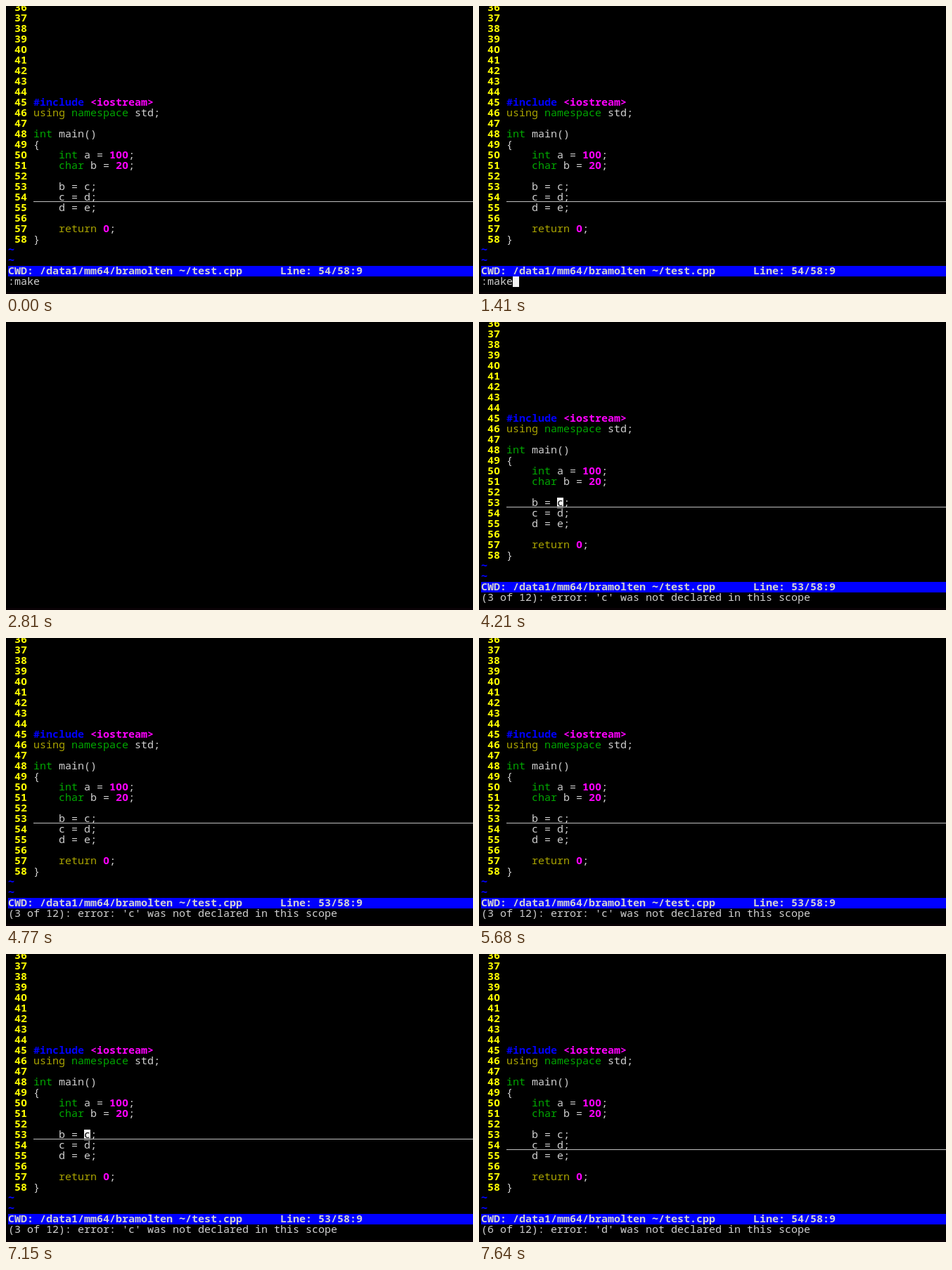
Recreate the animation shown at these times as an HTML page with a canvas. Size 664 px wide and 410 px high, loop 8000 ms.

```html
<!DOCTYPE html>
<html lang="en">
<head>
<meta charset="utf-8">
<title>Editor build session</title>
<style>
html, body { margin: 0; width: 664px; height: 410px; overflow: hidden; background: #000; }
canvas { display: block; }
</style>
</head>
<body>
<canvas id="stage" width="664" height="410"></canvas>
<script>
const ctx = document.getElementById('stage').getContext('2d');
const W = 664, H = 410, LOOP = 8000;
const CELL = 9, ROW = 15, LEFT = 3, TOP = -5, BASE = 12;
const GREY = '#c0c0c0', TEXT = '#d0d0d0', YELLOW = '#ffff00', BLUE = '#0000ff',
      PINK = '#ff00ff', GREEN = '#00a800', OLIVE = '#aaa400', LIGHT = '#f4f4f4';
const FIRST = 36, LAST = 58, STATUS = 25, COMMAND = 26, CODE_COL = 4;

const MONO = '"Noto Sans Mono", monospace';
// A plain zero and a broad tilde come from other faces
const faces = { '0': '"Noto Sans", sans-serif', '~': '"DejaVu Sans Mono", monospace' };

// Each piece: text, colour, bold
const code = {
  45: [['#include ', BLUE, true], ['<iostream>', PINK, true]],
  46: [['using ', OLIVE], ['namespace ', GREEN], ['std;']],
  48: [['int ', GREEN], ['main()']],
  49: [['{']],
  50: [['    int ', GREEN], ['a = '], ['100', PINK, true], [';']],
  51: [['    char ', GREEN], ['b = '], ['20', PINK, true], [';']],
  53: [['    b = c;']],
  54: [['    c = d;']],
  55: [['    d = e;']],
  57: [['    return ', OLIVE], ['0', PINK, true], [';']],
  58: [['}']]
};

const blinks = [500, 920, 1410, 1900, 2390, 2810, 4210, 4770, 5190,
                5680, 6170, 6660, 7150, 7640];
const CLEAR = 2810, RESULT = 4210, NEXT = 7360;

const cellX = col => LEFT + col * CELL;
const rowY = row => TOP + row * ROW;

function rect(x, y, w, h, color) {
  ctx.fillStyle = color;
  ctx.fillRect(x, y, w, h);
}

function write(text, col, row, color = TEXT, bold = false) {
  ctx.fillStyle = color;
  ctx.textAlign = 'center';
  const size = bold ? 'bold 15px ' : '15px ';
  [...text].forEach((ch, i) => {
    ctx.font = size + (faces[ch] || MONO);
    ctx.fillText(ch, cellX(col + i) + CELL / 2, rowY(row) + BASE);
  });
}

function cursor(col, row, ch) {
  rect(cellX(col), rowY(row), CELL, ROW, LIGHT);
  if (!ch) return;
  write(ch, col, row, '#000');
  rect(cellX(col), rowY(row) + 13, CELL, 1, '#000');
}

function drawEditor(line) {
  for (let n = FIRST; n <= LAST; n++) {
    const row = n - FIRST;
    write(String(n), 1, row, YELLOW, true);
    let col = CODE_COL;
    for (const [text, color, bold] of code[n] || []) {
      write(text, col, row, color, bold);
      col += text.length;
    }
    if (n === line) rect(cellX(CODE_COL), rowY(row) + 13, W, 1, GREY);
  }
  write('~', 0, 23, BLUE, true);
  write('~', 0, 24, BLUE, true);
  rect(LEFT, rowY(STATUS), W, ROW, BLUE);
  write('CWD: /data1/mm64/bramolten ~/test.cpp', 0, STATUS, TEXT, true);
  write('Line: ' + line + '/58:9', 43, STATUS, TEXT, true);
}

function draw(t) {
  rect(0, 0, W, H, '#000');
  rect(0, 407, W, 3, '#0a0206');
  if (t >= CLEAR && t < RESULT) return;

  const typing = t < CLEAR;
  const second = t >= NEXT;
  const line = typing || second ? 54 : 53;
  const lit = blinks.filter(b => b <= t).length % 2 === 1;
  drawEditor(line);

  if (typing) {
    write(':make', 0, COMMAND);
    if (lit) cursor(5, COMMAND);
  } else {
    const name = second ? 'd' : 'c';
    write(`(${second ? 6 : 3} of 12): error: '${name}' was not declared in this scope`, 0, COMMAND);
    if (lit) cursor(12, line - FIRST, name);
  }
}

const start = performance.now();
function tick() {
  draw((performance.now() - start) % LOOP);
  requestAnimationFrame(tick);
}
tick();
</script>
</body>
</html>
```
